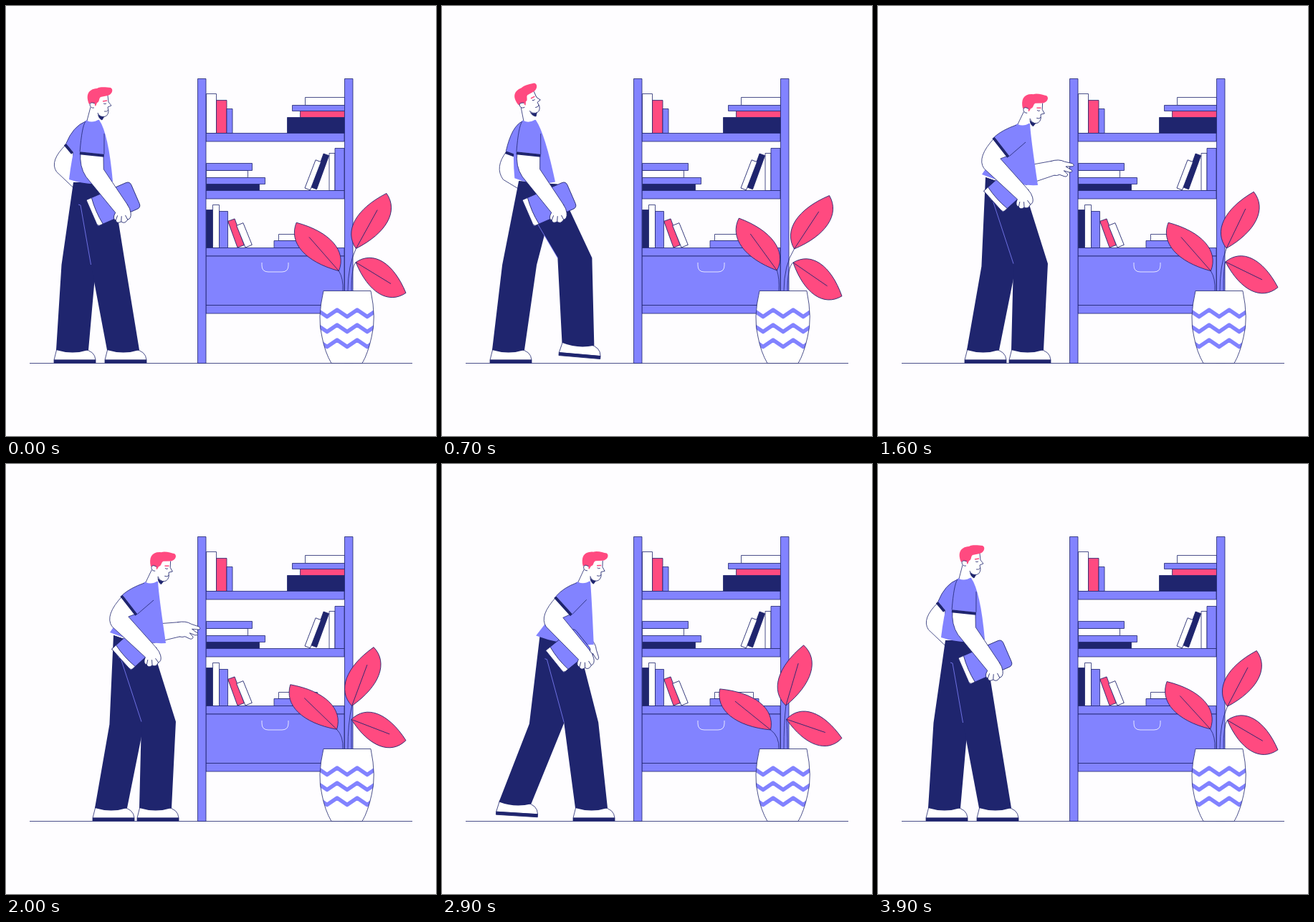
Recreate the animation shown at these times as an HTML page with a canvas. Size 600 by 600 pixels, loop 4000 ms.

```html
<!DOCTYPE html>
<html>
<head>
<meta charset="utf-8">
<style>
  html, body { margin: 0; height: 100%; overflow: hidden; background: #fefdff; }
  canvas { display: block; }
</style>
</head>
<body>
<canvas id="stage" width="600" height="600"></canvas>
<script>
const ctx = document.getElementById('stage').getContext('2d');
const NAVY = '#1f256e', BLUE = '#8283ff', PINK = '#ff4a80', WHITE = '#fff';
const LOOP = 4000, FLOOR = 498;

// Timing
const progress = (t, start, end) => Math.min(1, Math.max(0, (t - start) / (end - start)));
const ease = u => u * u * (3 - 2 * u);
const hold = (t, rise, top, fall, bottom) => ease(progress(t, rise, top)) - ease(progress(t, fall, bottom));
const hump = u => Math.sin(Math.PI * u);
const mix = (a, b, u) => a + (b - a) * u;

// Geometry
const add = ([x, y], dx, dy) => [x + dx, y + dy];
const blend = (a, b, u) => [mix(a[0], b[0], u), mix(a[1], b[1], u)];
const heading = (a, b) => Math.atan2(b[1] - a[1], b[0] - a[0]) * 180 / Math.PI;

// Maps local coordinates of a rotated frame to the stage
function frame([x, y], degrees) {
  const r = degrees * Math.PI / 180, c = Math.cos(r), s = Math.sin(r);
  return (u, v) => [x + u * c - v * s, y + u * s + v * c];
}

function placed([x, y], degrees, draw) {
  ctx.save();
  ctx.translate(x, y);
  ctx.rotate(degrees * Math.PI / 180);
  draw();
  ctx.restore();
}

function shape(path, fill, stroke = NAVY, width = .8) {
  const p = new Path2D(path);
  if (fill) { ctx.fillStyle = fill; ctx.fill(p); }
  if (stroke) { ctx.strokeStyle = stroke; ctx.lineWidth = width; ctx.stroke(p); }
}
const box = (x, y, w, h, fill) => shape(`M${x},${y}h${w}v${h}h${-w}z`, fill);

// Books are given as [width, height, colour]
function row(x, base, ...books) {
  for (const [w, h, color] of books) {
    box(x, base - h, w, h, color);
    x += w;
  }
}
function pile(x, base, rightAligned, ...books) {
  for (const [w, h, color] of books) {
    base -= h;
    box(rightAligned ? x - w : x, base, w, h, color);
  }
}
const leaning = (x, y, angle, w, h, fill) => placed([x, y], angle, () => box(0, -h, w, h, fill));

function drawShelf() {
  shape(`M33,${FLOOR}.5H567`);
  row(279.5, 177.5, [14, 55, WHITE], [14.5, 46, PINK], [8, 34, BLUE]);
  pile(472.5, 177.5, true, [80, 22, NAVY], [62, 9, PINK], [73, 8, BLUE], [55, 11, WHITE]);

  pile(279.5, 257.5, false, [74, 9, NAVY], [82, 9, BLUE], [58, 10, WHITE], [64, 10, BLUE]);
  row(451, 257.5, [8, 52, WHITE], [13, 59, BLUE]);
  leaning(426, 253, 20, 8, 50, NAVY);
  leaning(417, 254, 21, 8, 42, WHITE);

  row(279.5, 337.5, [9, 53, NAVY], [9, 60, WHITE], [12, 51, BLUE]);
  leaning(323, 337, -20, 10, 39, PINK);
  leaning(334, 337, -22, 10, 33, WHITE);
  box(380.5, 318.5, 54, 9, WHITE);
  box(374, 327.5, 68, 10, BLUE);

  for (const y of [177.5, 257.5, 337.5, 417.5]) box(279, y, 193, 11.5, BLUE);
  box(279, 349, 193, 68.5, BLUE);
  shape('M357,358v4q0,9 9,9h19q9,0 9,-9v-4', null, WHITE);
  for (const x of [267.5, 472.5]) box(x, 101.5, 11.5, 397, BLUE);
}

// Each edge of a leaf bulges at a different distance from its base
function leaf(root, bend, base, tip, side = 1) {
  const n = Math.hypot(tip[0] - base[0], tip[1] - base[1]), w = 27 * side;
  shape(`M${root}Q${bend} ${base}`);
  placed(base, heading(base, tip), () => {
    shape(`M0,0C${n * .15},${-w} ${n * .55},${-w} ${n},0C${n * .85},${w} ${n * .45},${w} 0,0Z`, PINK);
    shape(`M0,0H${n * .7}`);
  });
}

function drawPlant(t) {
  const sway = peak => Math.cos((t - peak) / LOOP * 2 * Math.PI);
  const a = sway(800), b = sway(680), c = sway(580);
  leaf([470, 398], [471, 380], [463 + 4.5 * a, 370 - a], [401 + 13.5 * a, 305 - 9 * a], -1);
  leaf([477, 398], [477, 362], [485.5 + 6 * b, 338 + b], [522 + 18.5 * b, 258.5 + 6 * b]);
  leaf([482, 398], [482, 364], [485 + 5 * c, 357 + c], [558, 393 + 12 * c]);

  const pot = 'M443,397.5H509Q517,436 510,462Q505,485 497,498.5H454Q445,483 441,462Q434,436 443,397.5Z';
  shape(pot, WHITE, null);
  ctx.save();
  ctx.clip(new Path2D(pot));
  for (const y of [424, 445, 466])
    shape(`M434,${y}l14,9.5l14,-9.5l14,9.5l14,-9.5l14,9.5l14,-9.5`, null, BLUE, 5.5);
  ctx.restore();
  shape(pot);
}

function drawArm(cuff, elbow, wrist, drawHand) {
  const angle = heading(elbow, wrist);
  const c = frame(cuff.at, cuff.angle), e = frame(elbow, angle), w = frame(wrist, angle), half = cuff.half - 1;
  shape(`M${c(-half, 0)}Q${add(elbow, -21, -6)} ${e(0, 14)}L${w(0, 10)}L${w(0, -10)}L${e(6, -12)}L${c(half, 0)}Z`, WHITE);
  placed(wrist, angle, drawHand);
}

function gripHand() {
  shape('M-2,10Q2,19 7,16Q12,18 13,11Q19,9 16,2Q18,-3 11,-7Q6,-10 -2,-10', WHITE);
  shape('M7,16L3,10M13,11L7,6M16,2L9,1');
}

function pointHand() {
  shape('M-2,-10Q10,-11 17,-5L27,0Q30,4 26,4L17,2L24,9Q25,12 20,11L13,7L17,13Q16,17 12,15L6,11Q2,12 -2,10', WHITE);
}

function drawSleeve(neck, front, cuff) {
  const c = frame(cuff.at, cuff.angle), half = cuff.half;
  const left = c(-half, 0), right = c(half, 0), top = add(neck, -10, 1);
  const seam = `M${left}Q${mix(left[0], top[0], .35)},${neck[1] + 8} ${top}`;
  shape(`M${c(-half, 2)}L${c(half, 2)}`, null, NAVY, 4);
  shape(`${seam}L${front}L${right}Z`, BLUE, null);
  shape(seam);
  return `M${front}L${right}`;
}

// Walks a foot to the shelf and back; a stride is [start, end, lift, tilt]
function footAt(t, home, away, there, back) {
  const u = progress(t, there[0], there[1]), v = progress(t, back[0], back[1]);
  return {
    at: [mix(home, away, ease(u) - ease(v)), FLOOR - there[2] * hump(u) - back[2] * hump(v)],
    angle: there[3] * hump(u) + back[3] * hump(v)
  };
}

// The knee bends forward as the hip and ankle come closer than the leg length
function kneeAt(hip, ankle, length) {
  const dx = ankle[0] - hip[0], dy = ankle[1] - hip[1], d = Math.hypot(dx, dy);
  const bend = Math.sqrt(Math.max(0, length * length - d * d)) / 2;
  return add(blend(hip, ankle, .5), bend * dy / d, -bend * dx / d - 2);
}

function drawLeg(hipBack, hipFront, hip, length, foot, inseam) {
  const f = frame(foot.at, foot.angle), knee = kneeAt(hip, f(-3, -18), length);
  const kneeBack = add(knee, -24, 0);
  placed(foot.at, foot.angle, () => {
    shape('M-25,-20L-29,-4H29Q28,-17 12,-19Z', WHITE);
    shape('M-29,-4H29V0H-29Z', NAVY);
  });
  shape(`M${hipBack}${inseam ? 'L' + inseam : ''}L${kneeBack}L${f(-26, -18)}Q${f(-3, -11)} ${f(19, -18)}L${add(knee, 24, 0)}L${hipFront}Z`, NAVY, null);
  if (inseam) shape(`M${add(inseam, -3, -1)}L${inseam}L${kneeBack}`, null, BLUE);
}

function drawBook(at, angle, length) {
  placed(at, angle, () => {
    shape(`M0,-20H${length - 6}q6,0 6,6V14q0,6 -6,6H0Z`, BLUE);
    shape('M0,-20H8Q5,0 8,20H3Q0,20 0,16Z', WHITE);
  });
}

function drawHead(at, angle, neck) {
  const h = frame(at, angle);
  shape(`M${h(-3, 4)}L${add(neck, -8, 0)}Q${add(neck, 0, 4)} ${add(neck, 9, -2)}L${h(10, 12)}Z`, WHITE, null);
  shape(`M${h(-3, 4)}L${add(neck, -8, 0)}`);
  placed(at, angle, () => {
    shape('M7,12Q12,18 16,17L13,22Q8,20 7,12Z', NAVY);
    shape('M-3,3L0,-14H21L22,-3L26,2L21,4L22,10Q21,18 14,17.5Q7,17 5,9Z', WHITE, null);
    shape('M21,-12L22,-3L26,2L21,4L22,10Q21,18 14,17.5Q9,17 7,12');
    shape('M-5,0C-10,-12 -7,-21 6,-22C12,-25 20,-23 25,-23C30,-20 26,-13 21,-12L11,-10C8,-8 10,-3 6,-2L4,3Q0,-4 -5,0Z', PINK, null);
    shape('M3,-1Q-4,-4 -4,1Q-3,6 2,5', WHITE);
    shape('M14,-4L20,-5', null, PINK, 1.5);
    shape('M15,-1q2,1.5 4,0M16,10q4,1 6,-2');
  });
}

function drawMan(t) {
  const walk = hold(t, 450, 1250, 2500, 3750);
  const lean = hold(t, 650, 1500, 2750, 3750);
  const turn = hold(t, 700, 1300, 2600, 3300);
  const reach = hold(t, 1250, 1600, 1850, 2400);
  const lookUp = hump(progress(t, 150, 1250)) ** 2;
  const bend = lean ** 1.5, crouch = lean ** 3;
  const sag = 75 * turn * (1 - lean);

  const neck = blend([121, 160], [203, 165], lean);
  const head = add(neck, 4 * lean - 10 * lookUp, 2 * lean - 23);
  const hipBack = blend([94, 246], [150, 239], walk);
  const hipFront = blend([148, 246], [205, 258], walk);
  const hemBack = add(blend([88, 242], [145, 235], walk), 0, sag);
  const hemFront = add(blend([149, 245], [223, 250], (walk + lean) / 2), 0, sag);
  const hip = blend(hipBack, hipFront, .5);

  const cuff = { at: add(neck, -1 - 29 * bend, 45 - 14 * bend), angle: 6 + 46 * bend, half: 17 };
  const elbow = add(neck, 2 - 47 * lean, 70 - 18 * lean);
  const wrist = [162 + 41 * bend, 284 - 20 * crouch];

  const farCuff = { at: add(neck, -32 + 32 * turn + 7 * lookUp, 38 + 7 * lookUp), angle: 50 - 30 * lookUp, half: 8 };
  const farElbow = add(neck, -40 + 40 * turn + 12 * lookUp, 62 + 9 * turn + 9 * lookUp);
  const farWrist = add(blend(add(hipBack, 16, 9), [231, 251], turn), 14 * reach, -25 * reach);

  const farFoot = footAt(t, 96, 150, [950, 1600, 15, 29], [2450, 3050, 10, 5]);
  const nearFoot = footAt(t, 167, 212, [300, 1050, 8, 5], [3050, 3750, 9, -9]);

  drawArm(farCuff, farElbow, farWrist, pointHand);
  drawSleeve(neck, add(neck, 0, 18), farCuff);
  drawLeg(hipBack, hipFront, add(hip, -11, 0), 233.5, farFoot);
  drawLeg(hipBack, hipFront, hip, 237, nearFoot, add(hipBack, 10, 32));

  const top = add(neck, -10, 0);
  shape(`M${top}Q${add(neck, 0, -4)} ${add(neck, 9, -1)}Q${add(neck, 22 - 12 * lean, 18)} ${hemFront}` +
    `Q${add(blend(hemBack, hemFront, .5), 0, 9)} ${hemBack}Q${add(neck, -26, 22)} ${top}Z`, BLUE, null);

  drawBook(add(wrist, -42, 5 + 4 * crouch), -23.5 - 18.5 * crouch, 66 - 26 * turn);
  drawArm(cuff, elbow, wrist, gripHand);
  shape(drawSleeve(neck, add(neck, 16 - 13 * lean, 18 + 7 * lean), cuff));
  drawHead(head, 9 * lean - 18 * lookUp, neck);
}

function render() {
  const t = performance.now() % LOOP;
  ctx.fillStyle = '#fefdff';
  ctx.fillRect(0, 0, 600, 600);
  ctx.lineJoin = 'round';
  drawShelf();
  drawPlant(t);
  drawMan(t);
  requestAnimationFrame(render);
}
render();
</script>
</body>
</html>
```
